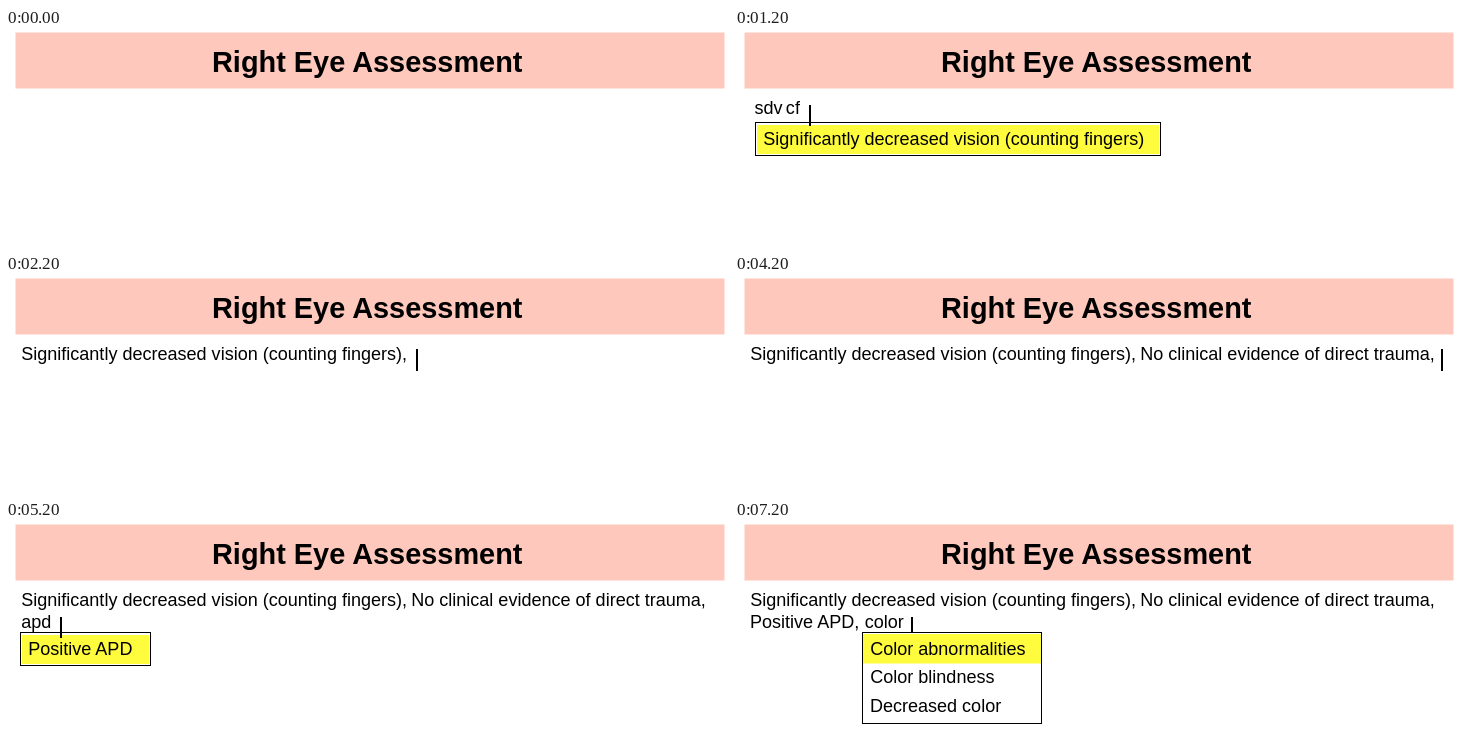
An HTML page that plays this animation: 723x218 px, repeating every 8 s.

```html
<!DOCTYPE html>
<html lang="en">
<head>
<meta charset="utf-8">
<title>Right Eye Assessment</title>
<style>
  html, body { margin: 0; width: 100%; height: 100%; overflow: hidden; background: #fff; }
  svg { display: block; width: 723px; height: 218px; }
  text { font: 18.04px "Liberation Sans", Arial, sans-serif; white-space: pre; }
  .title { font-size: 28.9px; font-weight: bold; }
  .box { fill: #fff; stroke: #000; }
  .pick { fill: #fffc3e; }
  .caret { stroke: #000; stroke-width: 2; }

  /* Each step lasts one second and starts at --at. */
  .step { animation: second 8s step-end calc(var(--at) - 8s) infinite; }
  .stay { animation: 8s step-end infinite; }
  .first { animation-name: first; }
  .trauma { animation-name: trauma; }
  .apd { animation-name: apd; }
  .color { animation-name: color; }

  @keyframes second { 0% { visibility: visible } 12.5%, 100% { visibility: hidden } }
  @keyframes first { 0% { visibility: hidden } 27.5%, 100% { visibility: visible } }
  @keyframes trauma { 0% { visibility: hidden } 52.5%, 100% { visibility: visible } }
  @keyframes apd { 0% { visibility: hidden } 77.5%, 100% { visibility: visible } }
  @keyframes color { 0% { visibility: hidden } 90%, 100% { visibility: visible } }
</style>
</head>
<body>
<svg viewBox="0 0 723 218">
  <rect x="9.5" y="4.5" width="709" height="56" fill="#ffc8bc"/>
  <text class="title" x="206" y="44">Right Eye Assessment</text>

  <!-- pointer -->
  <g class="step" style="--at: .2s">
    <path d="M18 92 L46 103 L35 107.5 L45 117 L42 120 L32.5 110 L28 120 Z" stroke="#fff"/>
  </g>

  <!-- entered text -->
  <text class="stay first" x="15.2" y="86">Significantly decreased vision (counting fingers),</text>
  <text class="stay trauma" x="405.2" y="86">No clinical evidence of direct trauma,</text>
  <text class="stay apd" x="15" y="108">Positive APD,</text>

  <!-- abbreviations and suggestions -->
  <g class="step" style="--at: 1.2s">
    <text x="19.4" y="86" word-spacing="-1.6">sdv cf</text>
    <rect class="box" x="20.5" y="94.5" width="405" height="33"/>
    <rect class="pick" x="22" y="97" width="402" height="29"/>
    <text x="28.3" y="117">Significantly decreased vision (counting fingers)</text>
    <path class="caret" d="M75 77V98"/>
  </g>

  <path class="caret step" style="--at: 2.2s" d="M411 75V97"/>

  <g class="step" style="--at: 3.2s">
    <text x="405.2" y="86">nce dt</text>
    <rect class="box" x="405.5" y="91.5" width="310" height="33"/>
    <rect class="pick" x="407" y="94" width="307" height="29"/>
    <text x="413.2" y="114">No clinical evidence of direct trauma</text>
    <path class="caret" d="M464 75V96"/>
  </g>

  <path class="caret step" style="--at: 4.2s" d="M707 75V97"/>

  <g class="step" style="--at: 5.2s">
    <text x="15.2" y="108">apd</text>
    <rect class="box" x="14.5" y="112.5" width="130" height="33"/>
    <rect class="pick" x="16" y="115" width="127" height="29"/>
    <text x="22.2" y="135">Positive APD</text>
    <path class="caret" d="M55 97V118"/>
  </g>

  <path class="caret step" style="--at: 6.2s" d="M132 97V119"/>

  <g class="stay color">
    <text x="129.7" y="108">color</text>
    <path class="caret" d="M177 97V113"/>
    <rect class="box" x="127.5" y="112.5" width="179" height="91"/>
    <rect class="pick" x="128" y="114" width="178" height="29.5"/>
    <text x="135.2" y="135">Color abnormalities</text>
    <text x="135.2" y="163">Color blindness</text>
    <text x="134.9" y="192">Decreased color</text>
  </g>
</svg>
</body>
</html>
```
